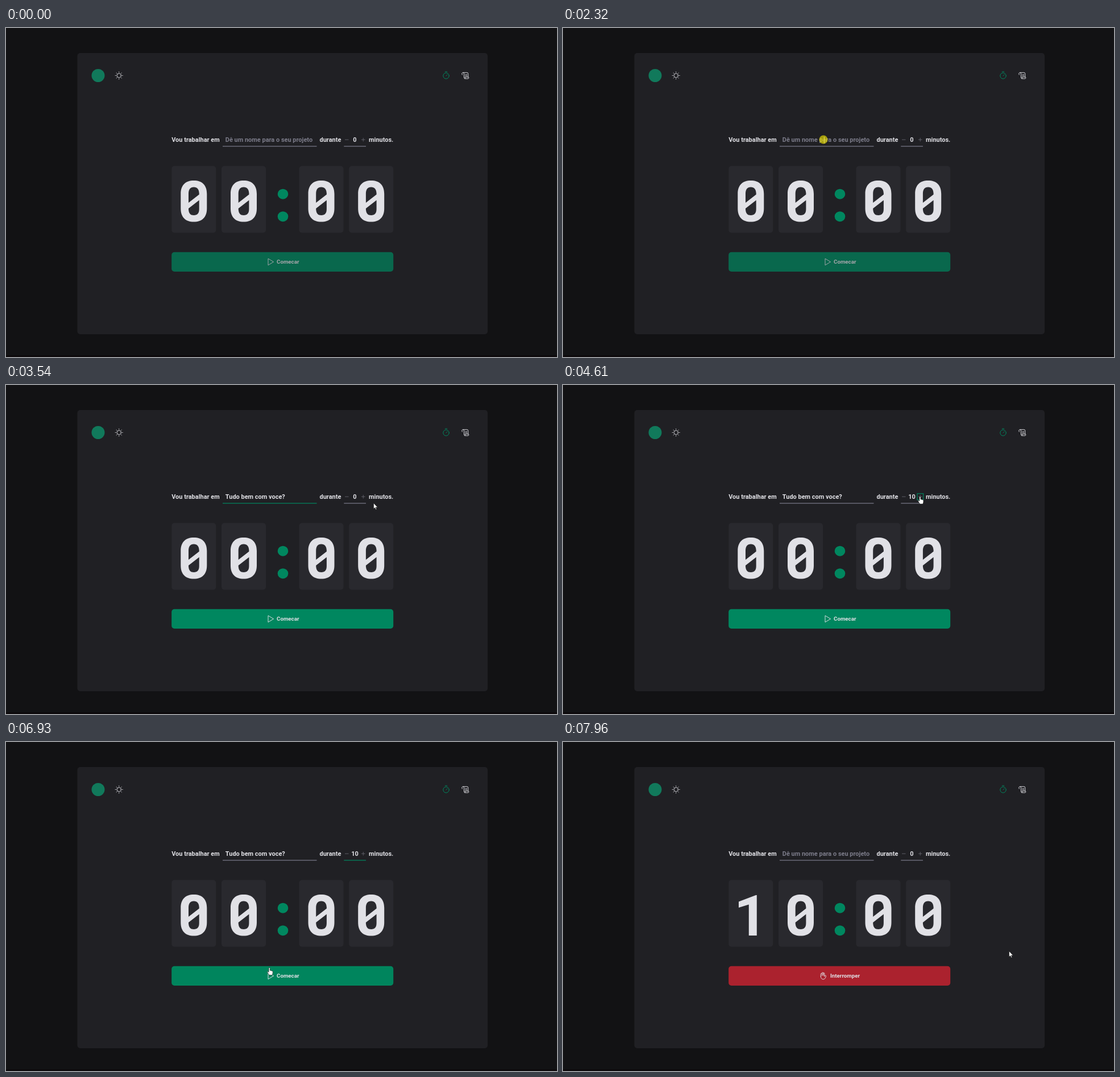
Recreate the animation shown at these times as an HTML page. Size 969 px wide and 578 px high, loop 8 s.

```html
<!DOCTYPE html>
<html lang="pt-BR">
<head>
<meta charset="utf-8">
<title>Timer</title>
<style>
  html, body { margin: 0; width: 100%; height: 100%; overflow: hidden; background: #121214; }
  svg { display: block; width: 969px; height: 578px; }
  text { fill: #e1e1e6; font: bold 10.97px Roboto, sans-serif; }
  .label { font-size: 9.75px; }
  .item { font: 6.85px "Open Sans", sans-serif; fill: #f0f0f0; }
  .icon { fill: none; stroke: #e1e1e6; stroke-width: .95; stroke-linecap: round; stroke-linejoin: round; }
</style>
</head>
<body>
<svg viewBox="0 0 969 578" xmlns="http://www.w3.org/2000/svg">
  <defs>
    <path id="zero" fill-rule="evenodd" d="M-23 291.5C-23 276-14.500 268 0 268S23 276 23 291.500V317C23 332.500 14.500 340.500 0 340.500S-23 332.500-23 317ZM-9.300 307V291.500C-9.300 283.500-6.300 279.500 0 279.500C5.800 279.500 9 283 9.400 290.500V292.500ZM9.400 302.500V318C9.400 325.500 6.300 329 0 329C-5.800 329-8.900 326-9.300 318.500V317Z"/>
    <path id="one" d="M10.500 340H-3.500V285.500L-21.300 291V280.500L9 269H10.500Z"/>
  </defs>

  <rect width="969" height="578" fill="#121214"/>
  <rect y="575" width="969" height="3" fill="#0d0a0c"/>
  <rect x="125.500" y="44" width="721.500" height="494" rx="5" fill="#202024"/>

  <circle cx="162" cy="83.500" r="11.500" fill="#11795b"/>
  <g class="icon">
    <g id="sun"><circle cx="198.700" cy="83.500" r="3.700"/></g>
    <g stroke="#00875f">
      <circle cx="774" cy="84" r="5.200"/>
      <path d="M772.300 76.800H775.700M774 84L776.200 81.800"/>
    </g>
    <path d="M802.300 82.300C801.100 80.500 802 78.300 803.700 78.300H810.800Q812.700 78.300 812.700 80.300V86.200M803.700 78.300Q805.500 78.400 805.500 80.300V87Q805.600 89 807.500 89H812C814.200 89 814.500 87.300 813.200 86.200H807.200Q808.500 88.900 807 89M807.700 81.900H810.700M807.700 84.100H810.700"/>
  </g>

  <text x="291.200" y="200">Vou trabalhar em</text>
  <text id="name" x="385.800" y="199.500"></text>
  <rect id="nameLine" x="381" y="207.200" width="165.500" height="1.200"/>
  <rect id="caret" x="490.700" y="190" width=".8" height="12" fill="#e1e1e6"/>
  <text x="551.500" y="200">durante</text>
  <text id="minutes" x="613.500" y="199.500" text-anchor="middle"></text>
  <rect id="minLine" x="594.300" y="207.200" width="38.700" height="1.200"/>
  <path d="M596 196.200H602.500M625 196.200H631.500M628.250 193V199.500" fill="none" stroke="#6c6c77" stroke-width=".8"/>
  <rect id="plusRing" x="623" y="190.800" width="10.700" height="10.900" fill="none" stroke="#00875f" stroke-width="1.200"/>
  <text x="638" y="200">minutos.</text>

  <g id="cards" fill="#29292e"></g>
  <g id="digits" fill="#e1e1e6"></g>
  <g fill="#00875f">
    <ellipse cx="487" cy="291.700" rx="9.300" ry="9"/>
    <ellipse cx="487" cy="331.200" rx="9.300" ry="9"/>
  </g>

  <g id="button">
    <rect id="buttonBox" x="291.200" y="393.800" width="390" height="34.200" rx="5"/>
    <g id="start">
      <path class="icon" d="M461 405.500V416.700L470.200 411.100Z"/>
      <text class="label" x="476" y="414.300">Comecar</text>
    </g>
    <g id="stop">
      <path class="icon" d="M453.300 411.500V407.700Q453.400 406.500 454.400 406.500T455.500 407.700V410.500V406Q455.600 404.800 456.600 404.800T457.700 406V410.300V406.700Q457.800 405.600 458.800 405.600T459.800 406.700V412L460.500 410.800C461.300 409.500 463 410.200 462.500 411.600C461.300 415 460.200 416.900 457.500 416.900Q453.300 416.600 453.300 411.500Z"/>
      <text class="label" x="470" y="414.300">Interromper</text>
    </g>
  </g>
  <rect id="buttonRing" x="290.600" y="393.200" width="391.200" height="35.400" rx="5.500" fill="none" stroke="#00875f" stroke-width="1.200"/>

  <g id="menu">
    <rect x="380" y="209" width="197" height="208.500" rx="3" fill="#000" opacity=".22"/>
    <rect x="381" y="209.500" width="194" height="206.300" rx="2" fill="#4a4a4a"/>
    <rect x="564.500" y="209.500" width="10" height="206.300" fill="#2e2e2e"/>
    <rect x="566" y="221.500" width="7" height="145.500" rx="1" fill="#686868"/>
    <path class="icon" d="M567.700 215.500L569.500 213.700L571.300 215.500M567.700 410L569.500 411.800L571.300 410"/>
  </g>

  <g id="cursor">
    <path id="arrow" d="M0 0V10L2.300 7.900L3.900 11.400L5.300 10.800L3.800 7.400H7Z" fill="#fff" stroke="#111" stroke-width=".6"/>
    <path id="hand" d="M-1.200 .9C-1.200-.4 1-.4 1 .9V5C1.600 4.400 2.700 4.600 2.800 5.400C3.400 4.900 4.400 5.200 4.500 6C5.200 5.600 5.900 6 5.900 6.800V9.500C5.900 10.800 5 11.400 5 13H-.6C-.8 11.600-2.500 10-3.600 7.800C-4 6.700-2.500 6.200-1.200 8Z" fill="#fff" stroke="#111" stroke-width=".6"/>
    <path id="beam" d="M0-4H3M1.500-4V6M0 6H3" fill="none" stroke="#c8c8c8" stroke-width=".8"/>
    <circle id="press" r="7.500" fill="#f5e800" opacity=".62"/>
  </g>
</svg>

<script>
const LOOP = 8000;
const GREEN = [0, 135, 95], DARK_GREEN = [1, 95, 67];
const RED = [171, 34, 46], DARK_RED = [122, 25, 33];
const OPENED = 2390, TYPED = 2710, LEFT = 4010, SUBMIT = 5890, RUN = 7270;

const $ = id => document.getElementById(id);
const set = (id, key, value) => $(id).setAttribute(key, value);
const show = (id, on) => set(id, "visibility", on ? "visible" : "hidden");
const within = (t, a, b) => t >= a && t < b;
const ramp = (t, a, b) => Math.min(1, Math.max(0, (t - a) / (b - a)));
const mix = (a, b, k) => `rgb(${a.map((v, i) => Math.round(v + (b[i] - v) * k))})`;

function add(parent, tag, attrs, text = "") {
  const el = document.createElementNS("http://www.w3.org/2000/svg", tag);
  for (const key in attrs) el.setAttribute(key, attrs[key]);
  el.textContent = text;
  return $(parent).appendChild(el);
}

// Static repeats
for (let i = 0; i < 8; i++) {
  const c = Math.cos(i * Math.PI / 4), s = Math.sin(i * Math.PI / 4);
  add("sun", "path", { d: `M${198.7 + 5.7 * c} ${83.5 + 5.7 * s}L${198.7 + 6.5 * c} ${83.5 + 6.5 * s}` });
}

const digits = [330.3, 418, 554.5, 642.2].map(x => {
  add("cards", "rect", { x: x - 39, y: 242.6, width: 78, height: 117.2, rx: 5 });
  return add("digits", "use", { href: "#zero", transform: `translate(${x} 0)` });
});

const cycle = "Interromper um ciclo em andamento!";
["Criar o readme!", cycle, cycle, cycle, cycle, cycle, "Criar o readme!", "Like no meu post!", "Tem muitos itens aqui !"]
  .forEach((text, i) => add("menu", "text", { class: "item", x: 389, y: 226 + 22.95 * i }, text));

// Pointer moves: start, end, control point, end point
const moves = [
  [200, 720, 700, 400, 513, 383],
  [720, 900, 513, 395, 519.5, 402.5],
  [1430, 2190, 480, 270, 458, 196],
  [3200, 3540, 570, 202, 646.5, 207.5],
  [3740, 3960, 640, 200, 628, 196],
  [4620, 5300, 560, 340, 474.5, 411],
  [5300, 5370, 474, 410, 473.8, 408.8],
  [6020, 6510, 468, 390, 462, 379],
  [6580, 6930, 460, 386, 463.3, 396.5],
  [6930, 7080, 467, 404, 475, 409],
  [7410, 7960, 660, 452, 784.5, 367.5]
];
const presses = [[1030, 1230], [2250, 2390], [4010, 4080], [4540, 4610], [5760, 5890], [7140, 7270]];

function pointer(t) {
  let x = 949, y = 570;
  for (const [a, b, cx, cy, ex, ey] of moves) {
    if (t < a) break;
    const k = (1 - Math.cos(Math.PI * ramp(t, a, b))) / 2, m = 1 - k;
    x = m * m * x + 2 * m * k * cx + k * k * ex;
    y = m * m * y + 2 * m * k * cy + k * k * ey;
  }
  return [x, y];
}

function menuAlpha(t) {
  if (t < OPENED || t >= 2920) return 0;
  if (t < 2450) return .6;
  if (t < TYPED) return 1;
  return t < 2780 ? .86 : t < 2850 ? .45 : .15;
}

function drawPointer(t) {
  const [x, y] = pointer(t);
  const overField = y > 185 && y < 207 && x > 381 && x < 547;
  const overPlus = y > 190 && y < 202 && x > 623 && x < 634;
  const overButton = t > TYPED && y > 394 && y < 428 && x > 291 && x < 681;
  const kind = overField ? "beam" : overPlus || overButton ? "hand" : "arrow";
  const visible = t >= 200;
  set("cursor", "transform", `translate(${x} ${y})`);
  for (const id of ["arrow", "hand", "beam"]) show(id, visible && id === kind);
  show("press", presses.some(([a, b]) => within(t, a, b)));
}

function draw(t) {
  const filled = within(t, TYPED, RUN), running = t >= RUN;

  $("name").textContent = filled ? "Tudo bem com voce?" : "Dê um nome para o seu projeto";
  $("name").style.fill = filled ? "#e1e1e6" : "#7c7c8a";
  $("minutes").textContent = running || t < LEFT ? "0" : t < 4610 ? "5" : "10";
  set("nameLine", "fill", within(t, OPENED, LEFT) ? "#00875f" : "#7c7c8a");
  set("minLine", "fill", within(t, SUBMIT, 7140) ? "#00875f" : "#7c7c8a");
  show("caret", within(t, OPENED, 3200));
  set("caret", "x", filled ? 490.7 : 386);
  show("plusRing", within(t, LEFT, 5760));

  digits[0].setAttribute("href", running ? "#one" : "#zero");

  const hover = ramp(t, 5170, 5370) - ramp(t, 6240, 6440) + ramp(t, 6920, 7120);
  set("buttonBox", "fill", running ? mix(DARK_RED, RED, ramp(t, 7720, 7920)) : mix(GREEN, DARK_GREEN, hover));
  set("button", "opacity", t < TYPED ? .7 : 1);
  show("start", !running);
  show("stop", running);
  show("buttonRing", within(t, 5760, SUBMIT) || within(t, 7140, RUN));

  set("menu", "opacity", menuAlpha(t));
  drawPointer(t);
}

const begin = performance.now();
function tick() {
  draw((performance.now() - begin) % LOOP);
  requestAnimationFrame(tick);
}
draw(0);
requestAnimationFrame(tick);
</script>
</body>
</html>
```
